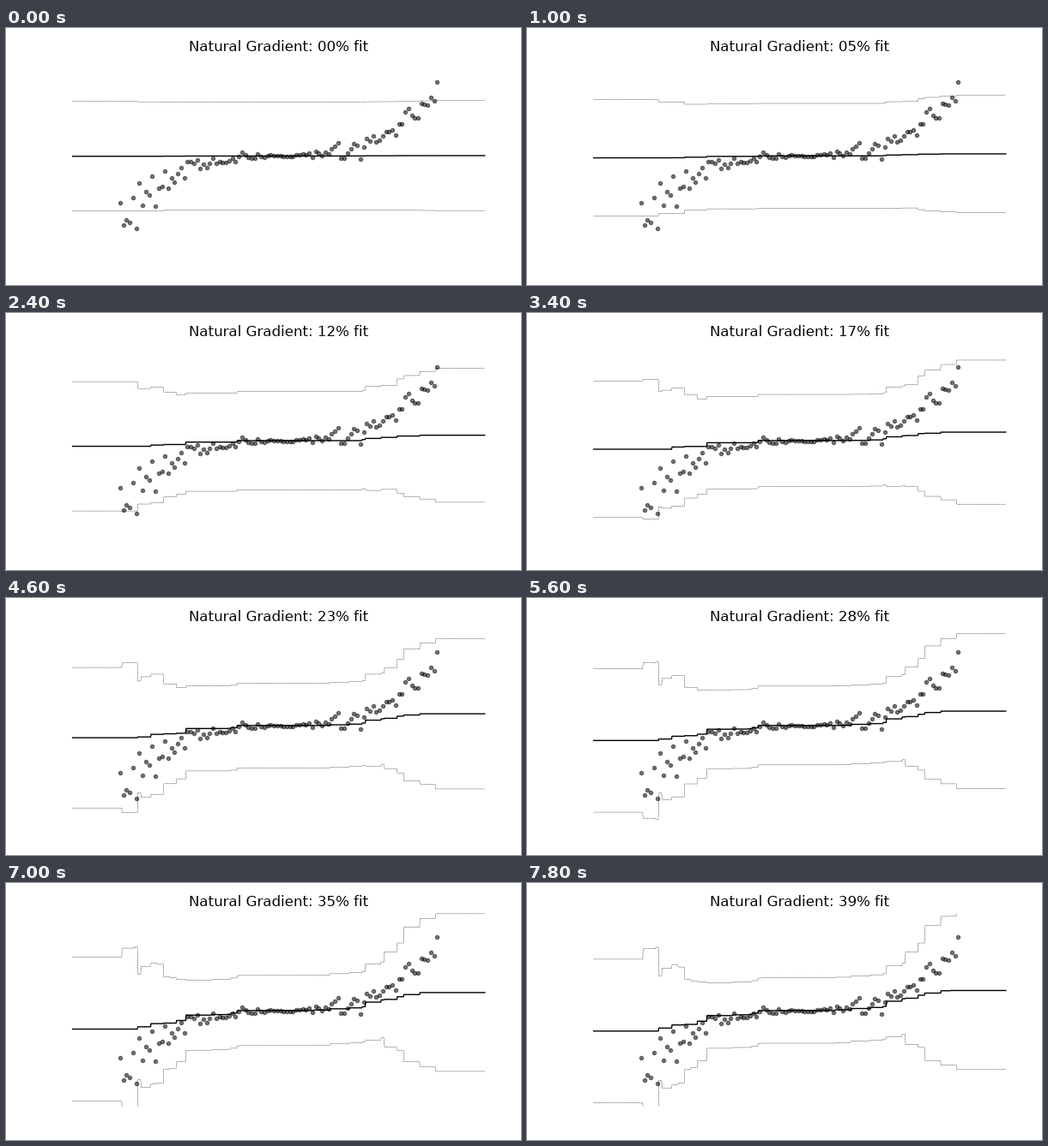
Write a matplotlib script that moves like this. It is 600 by 300 pixels and loops after 8 s.

```python
import math
import numpy as np
import matplotlib.pyplot as plt
from matplotlib.animation import FuncAnimation

W, H, DPI = 600, 300, 100
FRAMES, STEP_MS = 40, 200
RATE, DEPTH = 0.01, 3

plt.rcParams["text.hinting"] = "native"
plt.rcParams["text.kerning_factor"] = 6

norm_cdf = np.vectorize(lambda z: 0.5 * (1 + math.erf(z / math.sqrt(2))))


def cubic_data(n):
    """Noisy cubic whose noise grows away from zero."""
    x = np.linspace(-1, 1, n)
    noise = np.random.RandomState(1).randn(n) * (0.1 + 10 * np.abs(x))
    return x, 50 * x**3 + x + 0.9 * noise - 1


def crps(y, mu, log_sd):
    """CRPS of a normal forecast, and 2 * cdf - 1 at each y."""
    sd = np.exp(log_sd)
    z = (y - mu) / sd
    sign = 2 * norm_cdf(z) - 1
    pdf = np.exp(-z**2 / 2) / math.sqrt(2 * math.pi)
    return sd * (z * sign + 2 * pdf - 1 / math.sqrt(math.pi)), sign


def natural_gradient(y, mu, log_sd):
    score, sign = crps(y, mu, log_sd)
    root_pi = math.sqrt(math.pi)
    d_log_sd = score - (y - mu) * sign
    return -sign * root_pi, d_log_sd * 2 * root_pi / np.exp(2 * log_sd)


def tree_fit(g, depth):
    """Fitted values of a regression tree over points sorted by x."""
    n = len(g)
    if depth == 0 or n < 2:
        return np.full(n, g.mean())
    k = np.arange(1, n)
    left = np.cumsum(g)[:-1]
    gain = (left / k - (g.sum() - left) / (n - k))**2 * k * (n - k)
    cut = np.argmax(gain) + 1
    return np.concatenate([tree_fit(g[:cut], depth - 1),
                           tree_fit(g[cut:], depth - 1)])


def line_search(y, params, move):
    """Double the step until the loss worsens, then halve until it improves."""
    def loss(scale):
        return crps(y, *(params - scale * move))[0].mean()

    start, scale = loss(0), 1.0
    while loss(scale) <= start and scale <= 256:
        scale *= 2
    while loss(scale) >= start and scale > 1e-3:
        scale /= 2
    return scale


def boost(y, steps):
    """Mean and log deviation at every point after each boosting step."""
    params = np.array([np.full(len(y), y.mean()),
                       np.full(len(y), np.log(y.std()))])
    stages = []
    for _ in range(steps):
        move = np.array([tree_fit(g, DEPTH)
                         for g in natural_gradient(y, *params)])
        params = params - RATE * line_search(y, params, move) * move
        stages.append(params)
    return stages


x, y = cubic_data(100)
stages = boost(y, FRAMES)

# Trees split halfway between points, so each grid value uses its nearest point
grid = np.linspace(-1.3, 1.3, 1000)
nearest = np.abs(grid[:, None] - x).argmin(axis=1)

fig = plt.figure(figsize=(W / DPI, H / DPI), dpi=DPI, facecolor="white")
ax = fig.add_axes([53.6 / W, 39 / H, 528.2 / W, 226 / H])
ax.set_xlim(-1.43, 1.43)
ax.set_ylim(-75, 75)
ax.axis("off")

ax.scatter(x, y, color="black", marker=".", alpha=0.5)
mean_line, = ax.plot([], [], "k-", lw=1)
upper_line, = ax.plot([], [], "k--", lw=0.3)
lower_line, = ax.plot([], [], "k--", lw=0.3)
title = ax.set_title("", fontsize=12, family="DejaVu Sans")


def draw(step):
    mu, log_sd = stages[step][:, nearest]
    band = 2 * np.exp(log_sd)
    mean_line.set_data(grid, mu)
    upper_line.set_data(grid, mu + band)
    lower_line.set_data(grid, mu - band)
    title.set_text(f"Natural Gradient: {step:02d}% fit")
    return mean_line, upper_line, lower_line, title


anim = FuncAnimation(fig, draw, frames=FRAMES, interval=STEP_MS,
                     repeat=True, repeat_delay=0)
plt.show()
```
